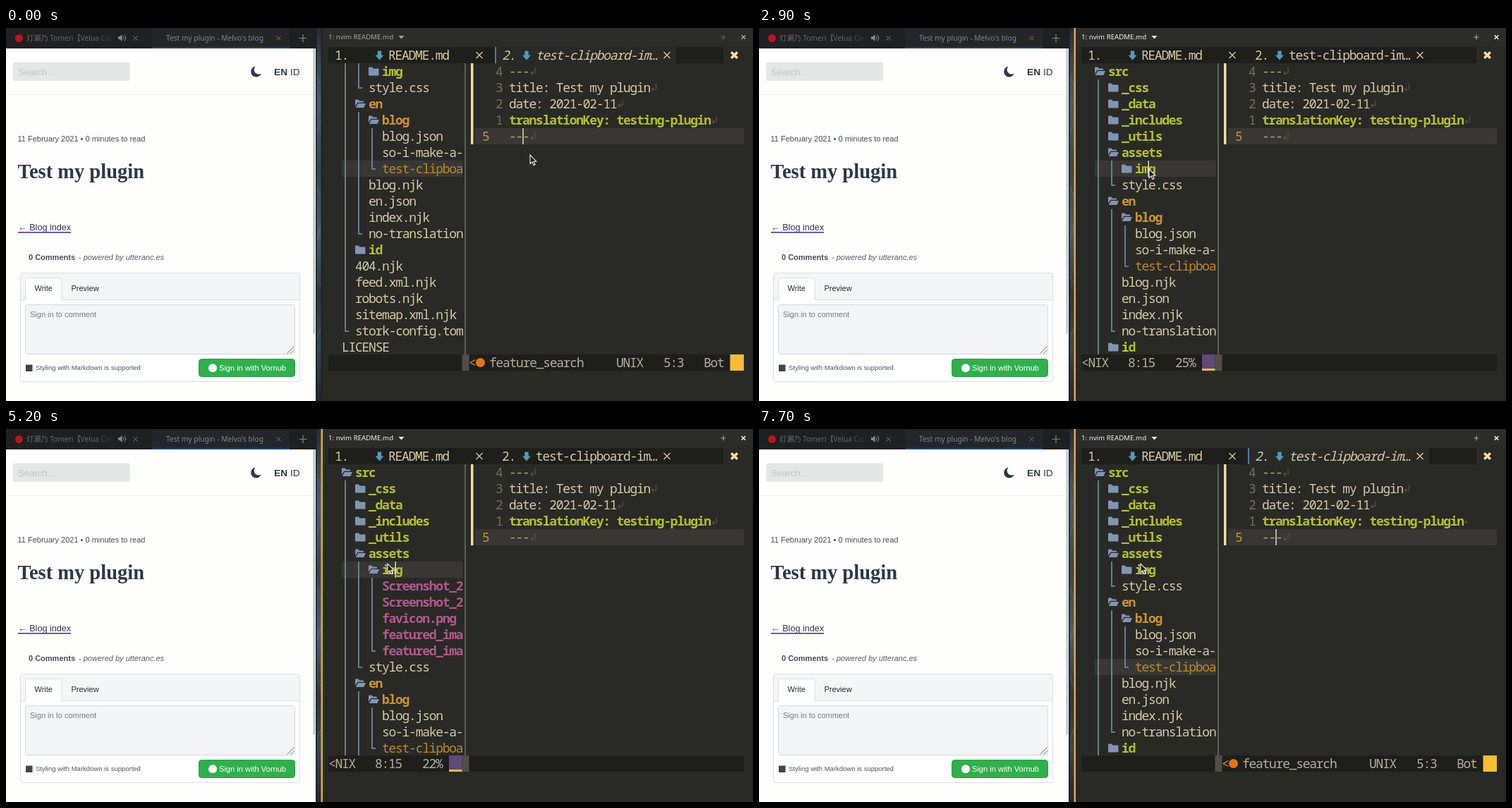
Write an HTML page that moves like this. It is 1059 by 529 pixels and loops after 8000 ms.

```html
<!DOCTYPE html>
<html lang="en">
<head>
<meta charset="utf-8">
<title>Blog and editor</title>
<style>
  html, body { margin: 0; width: 100%; height: 100%; overflow: hidden; background: #292a26; }
  svg { display: block; width: 1059px; height: 529px; }
  text { white-space: pre; }
  .ui { font-family: "Noto Sans", "Noto Sans CJK JP", sans-serif; }
  .web { font: 11px "Liberation Sans", Arial, sans-serif; fill: #24292e; }
  .mono { font: 300 18px "Noto Sans Mono", monospace; letter-spacing: -1.27px; }
  .b { font-weight: 600; }
  .i { font-style: italic; }
  .line { fill: none; }
</style>
</head>
<body>
<svg viewBox="0 0 1059 529" xmlns="http://www.w3.org/2000/svg">
  <defs>
    <linearGradient id="wall" x2="0" y2="1">
      <stop offset="0" stop-color="#262c33"/>
      <stop offset=".06" stop-color="#343f4a"/>
      <stop offset=".2" stop-color="#4b5e6f"/>
      <stop offset=".38" stop-color="#374552"/>
      <stop offset=".55" stop-color="#4b5e6e"/>
      <stop offset=".72" stop-color="#2b3640"/>
      <stop offset=".85" stop-color="#384751"/>
      <stop offset="1" stop-color="#20282f"/>
    </linearGradient>
    <linearGradient id="fade">
      <stop offset="0" stop-color="#1f2022" stop-opacity="0"/>
      <stop offset="1" stop-color="#1f2022"/>
    </linearGradient>
    <clipPath id="tabClip"><rect x="28" width="126" height="28"/></clipPath>
    <clipPath id="treeClip"><rect x="457" y="50" width="191" height="413"/></clipPath>
  </defs>

  <!-- browser tabs -->
  <rect width="439" height="29" fill="#1f2022"/>
  <rect x="207" width="195" height="29" fill="#242629"/>
  <rect x="207" y="27" width="195" height="2" fill="#1d4870"/>
  <circle cx="18.5" cy="14.5" r="5.5" fill="#c1121f"/>
  <g class="ui" font-size="10.2">
    <text x="29" y="18" fill="#65696c" clip-path="url(#tabClip)">灯瀬乃 Tomeri【Velua Cad</text>
    <text x="227" y="18" fill="#7b8790">Test my plugin - Melvo's blog</text>
  </g>
  <rect x="126" width="28" height="27" fill="url(#fade)"/>
  <path d="M159 12h2.500l3-3v10l-3-3H159z" fill="#85898c"/>
  <path class="line" d="M166 11.500q2 2.500 0 5M168 9.500q3.500 4.500 0 9" stroke="#85898c"/>
  <path class="line" d="M180.500 11.500l6 6m0-6l-6 6M383.500 11.500l6 6m0-6l-6 6" stroke="#74787b"/>
  <path class="line" d="M415.500 14.500h11M421 9v11" stroke="#85898c" stroke-width="1.200"/>

  <!-- blog page -->
  <g class="web">
    <rect y="29" width="439" height="500" fill="#fefffc"/>
    <rect y="94" width="435" height="1" fill="#eef0f0"/>
    <rect x="435.500" y="29" width="2.500" height="405" rx="1" fill="#bfc3c5"/>
    <rect x="10" y="48.500" width="166" height="26.500" rx="3" fill="#e5e7e6"/>
    <text x="17" y="67" style="font-size:13px;fill:#bfc6c6">Search…</text>
    <path d="M353.500 54.500A7.500 7.500 0 1 0 361.700 64.500A6.500 6.500 0 0 1 353.500 54.500Z" fill="#2d3748"/>
    <text x="380" y="67" style="font-size:13.700px;font-weight:700;fill:#2d3748">EN</text>
    <text x="403" y="67" style="font-size:13.700px;fill:#2d3748">ID</text>
    <text x="16.500" y="161" style="fill:#434b57">11 February 2021 • 0 minutes to read</text>
    <text x="16.500" y="213" style="font:700 28.500px 'Liberation Serif',serif;fill:#2d3748">Test my plugin</text>
    <text x="17" y="287" style="font-size:12.650px;fill:#2d3748">← Blog index</text>
    <rect x="17" y="289" width="75" height="1.700" fill="#553c9a"/>
    <text x="32" y="329" style="font-weight:700;fill:#434b57">0 Comments</text>
    <text x="103" y="329" class="i" style="fill:#555c66">- powered by utteranc.es</text>

    <rect x="20.500" y="347.500" width="396" height="154" rx="3" fill="#fefffe" stroke="#dadfe2"/>
    <path d="M21 385V351q0-3 3-3H413q3 0 3 3V385z" fill="#f3f5f6"/>
    <rect x="21" y="385" width="395" height="1" fill="#dadfe2"/>
    <path d="M27.500 386V357.500q0-3 3-3H76q3 0 3 3V386" fill="#fefffe" stroke="#dadfe2"/>
    <text x="40.500" y="373">Write</text>
    <text x="92.500" y="373">Preview</text>
    <rect x="27.500" y="392.500" width="382" height="70" rx="3" fill="#f2f4f5" stroke="#d3d8db"/>
    <text x="34" y="410" style="fill:#767c82">Sign in to comment</text>
    <path class="line" d="M398.500 461.500l10-10M403.500 461.500l5-5" stroke="#777"/>
    <rect x="28" y="477.500" width="9.500" height="9.500" fill="#3f454b"/>
    <text x="42" y="485" style="font-size:9.500px;fill:#4d545b">Styling with Markdown is supported</text>
    <rect x="273.500" y="469.500" width="136" height="25" rx="4" fill="#30b04c" stroke="#2b9c46"/>
    <circle cx="293" cy="482.300" r="6" fill="#fff"/>
    <text x="302" y="486" style="font-size:11.100px;fill:#fff">Sign in with Vornub</text>
  </g>

  <!-- gap between the windows, then the terminal -->
  <rect x="439" width="10" height="529" fill="url(#wall)"/>
  <rect x="439" width="1.500" height="529" fill="#1c2126"/>
  <path class="line" d="M441 70l6 14M441 150l6-20M441 225l6 18M441 300l6-22M441 352l6 14M441 440l6-16" stroke="#8798a5" stroke-opacity=".3"/>
  <rect x="448.500" width="611" height="529" fill="#292a26"/>
  <rect x="448.500" width="611" height="27" fill="#2c2d2a"/>
  <g id="term"></g>
  <path id="mouse" d="M0 0V12.500L3 9.900L5 14.600L7.100 13.700L5.100 9.200H8.800Z" fill="#1b1b1b" stroke="#f4f4f4" stroke-width="1.100"/>
</svg>
<script>
const LOOP = 8000, CELL = 9.53, ROW = 23, TOP = 50;
const C = {
  text: '#d5c8a2', dim: '#b0a688', num: '#746d63', green: '#b4c02b', orange: '#cd942b',
  open: '#bd872d', pink: '#b1588c', folder: '#8094b4', dark: '#1e1f1b', cursorLine: '#383733',
  eol: '#55534c', status: '#b3ad9b', yellow: '#f6bd30', block: '#504e48'
};

// depth, kind (+ closed, - open, . file, ! last file, * image, # last image), name
const TREE = `0-src 1+_css 1+_data 1+_includes 1+_utils 1-assets 2+img
  3*Screenshot_2 3*Screenshot_2 3*favicon.png 3*featured_ima 3#featured_ima
  2!style.css 1-en 2-blog 3.blog.json 3.so-i-make-a- 3!test-clipboa 2.blog.njk
  2.en.json 2.index.njk 2!no-translation 1+id 1.404.njk 1.feed.xml.njk
  1.robots.njk 1.sitemap.xml.njk 1!stork-config.tom 0.LICENSE`
  .split(/\s+/).map(s => ({ depth: +s[0], kind: s[1], name: s.slice(2) }));

const DOC = ['---', 'title: Test my plugin', 'date: 2021-02-11',
  'translationKey: testing-plugin', '---'];

// tables of [start, value...]; each value holds until the next entry
const MOUSE = [[0, 743, 180], [1100, 574, 145], [2200, 566, 160], [2300, 556, 184],
  [2400, 553, 200], [3600, 549, 280], [3700, 544, 335], [3800, 542, 352], [3900, 501, 310],
  [4000, 520, 235], [4100, 620, 222], [4200, 688, 262], [4300, 610, 300], [4400, 545, 285],
  [4500, 540, 262], [4600, 535, 235], [4700, 537, 210], [4800, 543, 191], [5000, 541, 191]];
const BEAM = [[0, 1], [600, 0], [1100, 1], [1400, 0], [1700, 1], [2200, 0], [2900, 1],
  [3600, 0], [4200, 1], [4700, 0], [5200, 1]];
const SCROLL = [[0, 6], [1500, 3], [1700, 0]];

const at = (table, t) => table.filter(e => e[0] <= t).pop().slice(1);
const within = (t, a, b) => t >= a && t < b;

const rect = (x, y, w, h, fill) =>
  `<rect x="${x}" y="${y}" width="${w}" height="${h}" fill="${fill}"/>`;
const path = (d, x, y, stroke, width = 1.2) =>
  `<path class="line" d="${d}" transform="translate(${x} ${y})" stroke="${stroke}" stroke-width="${width}"/>`;
const shape = (d, x, y, fill) =>
  `<path d="${d}" transform="translate(${x} ${y})" fill="${fill}"/>`;
const mono = (x, y, s, fill, cls = '') =>
  `<text class="mono ${cls}" x="${x}" y="${y}" fill="${fill}">${s.replace('<', '&lt;')}</text>`;
const cross = (x, y, r, stroke, width) =>
  path(`M${-r} ${-r}L${r} ${r}M${r} ${-r}L${-r} ${r}`, x, y, stroke, width);

const FOLDER = 'M0 1Q0 0 1 0H5L6.500 2H13.500Q14.500 2 14.500 3V11Q14.500 12 13.500 12H1Q0 12 0 11Z';
const OPEN = 'M0 9.500V1Q0 0 1 0H4.500L6 2H11Q12 2 12 3V4.300H3.300ZM4 5.500H15L12.300 11.500H.8Z';
const ARROW = 'M-2.700-6H2.700V0H6L0 7L-6 0H-2.700Z';

function titleBar(focused) {
  const fg = focused ? '#f1f1ec' : '#a6a69f';
  return `<text class="ui" font-size="9.700" x="457" y="16" fill="${fg}">1: nvim README.md</text>` +
    shape('M0 0H8L4 4.500Z', 556.5, 11, fg) +
    path('M-3.500 0H3.500M0-3.500V3.500', 1017, 13, focused ? '#a6a69f' : '#63635e') +
    cross(1045.5, 13, 2.8, fg, 1.6);
}

function tabs(inTree) {
  const x = 693, y = 45;
  return rect(457, 27, 589, ROW, C.dark) + rect(1017, 27, 29, ROW, '#292a26') +
    (inTree ? '' : rect(x, 27, 257, ROW, '#292a26') + rect(x, 27, 2, ROW, '#4d7ba3')) +
    mono(466, y, '1.', C.text) + shape(ARROW, 529.5, 38.5, '#519aba') +
    mono(542, y, 'README.md', C.text) + cross(671, 38.5, 4.5, C.text, 1.4) +
    mono(703, y, '2.', C.text, inTree ? '' : 'i') + shape(ARROW, 738, 38.5, '#519aba') +
    mono(751, y, 'test-clipboard-im…', C.text, inTree ? '' : 'i') +
    cross(937, 38.5, 4.5, C.text, 1.4) + cross(1032.5, 38.5, 4.3, '#eddcae', 3.6);
}

function treeRow(item, y, open) {
  const { depth, kind, name } = item, dir = kind === '+' || kind === '-';
  const last = kind === '!' || kind === '#', image = kind === '*' || kind === '#';
  const x = 476 + 19 * depth;
  let out = '';
  for (let k = 0; k < depth; k++) {
    const corner = last && k === depth - 1;
    out += path(corner ? 'M0 0V12H5' : 'M0 0V23', 481 + 19 * k, y, C.folder, 1.5);
  }
  if (dir) out += shape(open ? OPEN : FOLDER, x, y + 5.5, C.folder);
  const dirty = name === 'en' || name === 'blog';
  const fill = image ? C.pink : dirty ? C.orange : dir ? C.green :
    name === 'test-clipboa' ? C.open : C.text;
  return out + mono(x + (dir ? 19 : 0), y + 18, name, fill, dir || image ? 'b' : '');
}

function tree(s) {
  const rows = TREE.filter(r => s.expanded || !'*#'.includes(r.kind));
  const current = s.inTree ? s.treeLine : rows.findIndex(r => r.name === 'test-clipboa');
  const body = rows.slice(s.scroll, s.scroll + 18).map((r, i) => {
    const y = TOP + ROW * i;
    return (i + s.scroll === current ? rect(476, y, 171.5, ROW, C.cursorLine) : '') +
      treeRow(r, y, r.kind === '-' || (r.name === 'img' && s.expanded));
  }).join('');
  return `<g clip-path="url(#treeClip)">${body}</g>` + rect(650, TOP, 2, 413, '#5d5c57');
}

function editor(s) {
  let out = rect(665, TOP + ROW * s.line, 381, ROW, C.cursorLine) +
    rect(659, TOP, 3.5, ROW * DOC.length, '#eddcae');
  DOC.forEach((line, i) => {
    const y = TOP + ROW * i, here = i === s.line, key = i === 3;
    out += here ? mono(675, y + 18, String(i + 1), C.orange)
      : mono(694, y + 18, String(Math.abs(i - s.line)), C.num);
    out += mono(713, y + 18, line, key ? C.green : line === '---' ? C.dim : C.text, key ? 'b' : '');
    const small = key && s.shortMark;
    out += path(small ? 'M7 13H2M4 11L2 13L4 15' : 'M8.500 6V14H2.500M5 11.500L2.500 14L5 16.500',
      713 + CELL * line.length, y, C.eol);
  });
  return out;
}

function statusLine(s) {
  const y = 463, base = y + 18;
  let out = rect(457, y, 589, ROW, C.dark) + rect(646.5, y, 10, ROW, C.block);
  if (s.inTree) {
    const pos = s.treeLine === 6 ? '8:15' : '7:13';
    const share = s.treeLine === 6 && !s.expanded ? '25%' : '22%';
    return out + mono(457, base, '<NIX', C.status) + mono(523, base, pos, C.status) +
      mono(590, base, share, C.status) + rect(628, y, 18.5, ROW, '#5f4a78') +
      rect(628, 483, 18.5, 3, C.yellow);
  }
  return out + mono(656, base, '<', C.orange) +
    '<circle cx="672.500" cy="474.500" r="6.500" fill="#e8730c"/>' +
    mono(685, base, 'feature_search', C.status) + mono(865, base, 'UNIX', C.status) +
    mono(932, base, `${s.line + 1}:3`, C.status) +
    mono(989, base, s.line === 4 ? 'Bot' : '80%', C.status) + rect(1026.5, y, 19.5, ROW, C.yellow);
}

function beam(s) {
  if (!s.beam) return '';
  const [x, row] = s.inTree ? [551.5, s.treeLine] : [732.3, s.line];
  return rect(x, TOP + ROW * row, 1.5, ROW, '#e6dab5');
}

const stateAt = t => ({
  focused: t >= 600,
  inTree: within(t, 2800, 6700),
  expanded: within(t, 3100, 5500),
  treeLine: t < 5800 ? 6 : 5,
  scroll: at(SCROLL, t)[0],
  beam: at(BEAM, t)[0] && !within(t, 2800, 2900),
  line: within(t, 7300, 7700) ? 3 : 4,
  shortMark: t >= 7700
});

const term = document.getElementById('term'), mouse = document.getElementById('mouse');
let shown = '';

function draw() {
  const t = performance.now() % LOOP, s = stateAt(t), key = JSON.stringify(s);
  if (key !== shown) {
    shown = key;
    term.innerHTML = rect(446.5, 0, 2.5, 529, s.focused ? '#e3a73f' : '#22241f') +
      titleBar(s.focused) + tabs(s.inTree) + tree(s) + editor(s) + statusLine(s) + beam(s);
  }
  mouse.setAttribute('transform', `translate(${at(MOUSE, t).join(' ')})`);
  requestAnimationFrame(draw);
}
draw();
</script>
</body>
</html>
```
